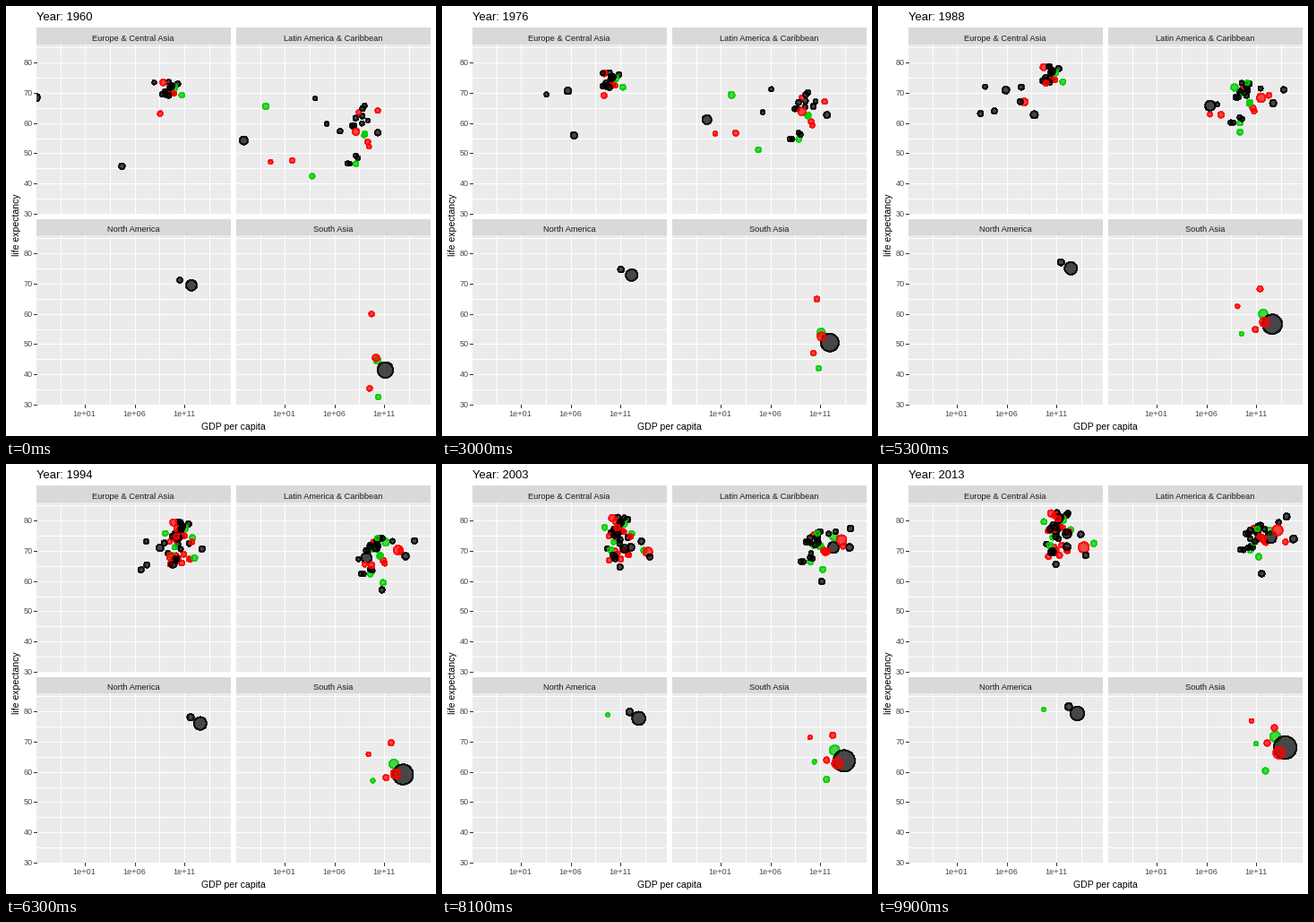
These frames come from a looping animation (480 px wide and 480 px high, 10 s). A matplotlib script:

```python
import numpy as np
import matplotlib.pyplot as plt
from matplotlib.animation import FuncAnimation
from matplotlib.patches import Rectangle

FRAMES = 100
LAST = FRAMES - 1
SIZE, DPI = 480, 80
PT = 72 / DPI                       # points per pixel
DECADE, PER_YEAR = 11.08, 3.376     # pixels per power of ten, per year of life
BLACK, RED, GREEN = (0, 0, 0), (1, 0, 0), (0, .804, 0)

plt.rcParams["font.family"] = "Liberation Sans"
rng = np.random.default_rng(8)


def lerp(a, b, f):
    return a + (b - a) * f


class Bubble:
    """Moves from a to b, both (log10 GDP, life expectancy).

    A surge (first, last) packs the GDP change into an eased inflation period.
    """

    def __init__(self, color, d, a, b, start=0, end=LAST, surge=None):
        self.color, self.d, self.a, self.b = color, d, a, b
        self.start, self.end, self.surge = start, end, surge

    def at(self, i):
        p = (i - self.start) / (LAST - self.start)
        f = p
        if self.surge:
            first, last = self.surge
            u = np.clip((i - first) / (last - first), 0, 1)
            f = u * u * (3 - 2 * u)
        return lerp(self.a[0], self.b[0], f), lerp(self.a[1], self.b[1], p ** .9)

    def diameter(self, i):
        return lerp(*self.d, i / LAST)


def cloud(n, colors, gdp0, gdp1, life0, life1, start=0, big=6.5):
    """Small bubbles that keep their rank while the whole cloud drifts."""
    bubbles = []
    for k in range(n):
        u, v = rng.random(2)
        d = rng.uniform(5, big)
        bubbles.append(Bubble(colors[k % len(colors)], (d, d + .8),
                              (lerp(*gdp0, u), lerp(*life0, v)),
                              (lerp(*gdp1, u), lerp(*life1, v)), start + k % 4 * (start > 0)))
    return bubbles


europe = cloud(16, (BLACK, BLACK, RED, BLACK, BLACK, RED, GREEN, BLACK),
               (8.8, 10.8), (10.4, 12.5), (68.5, 73.5), (76, 82.5), big=8)
europe += cloud(22, (RED, BLACK, RED, BLACK, RED, GREEN),
                (8.7, 11.8), (9.5, 12.4), (64, 77), (67, 82), start=56)
europe += [
    Bubble(BLACK, (9, 9), (-3.9, 68.3), (-3.9, 68.3), end=9),
    Bubble(BLACK, (8, 8.5), (5.75, 70.3), (12.1, 71.2), start=10, surge=(50, 78)),
    Bubble(BLACK, (7, 10), (4.75, 45.6), (12.1, 75.5), surge=(0, LAST)),
    Bubble(BLACK, (5, 6), (3.6, 66.6), (10.4, 76.7), start=9, surge=(50, 75)),
    Bubble(BLACK, (5, 6), (8, 73.3), (12.2, 82.3)),
    Bubble(RED, (6, 7), (8.6, 63), (11.2, 80.5)),
    Bubble(BLACK, (7, 7), (12.7, 69.5), (13.5, 75.3), start=57),
    Bubble(GREEN, (7, 7), (11.6, 66.5), (14.8, 72.3), start=57),
    Bubble(RED, (4, 12), (7.8, 66.5), (13.8, 71), start=50, surge=(53, 80)),
]
for a, b in [((7.4, 66.8), (14, 68.4)), ((4.8, 63.4), (10.5, 69.3)),
             ((3.4, 62.8), (11, 65.4)), ((7.5, 71.5), (11, 74.6))]:
    europe.append(Bubble(BLACK, (6, 7), a, b, start=50, surge=(53, 75)))

latin = cloud(17, (BLACK, BLACK, RED, BLACK, GREEN, BLACK),
              (7.2, 9.5), (9.3, 12), (46, 66), (70, 78.5))
latin += cloud(6, (BLACK, GREEN, BLACK), (8.2, 10), (9.4, 11.4), (68, 73), (72, 79), start=38)
latin += [
    Bubble(GREEN, (7, 9), (-.9, 65.4), (12.4, 76.4), surge=(10, 75)),
    Bubble(GREEN, (6, 7), (3.8, 42.3), (11.3, 67.9), surge=(18, 70)),
    Bubble(BLACK, (9.5, 13.5), (-3.1, 54.1), (12.5, 74.3), surge=(10, 85)),
    Bubble(BLACK, (5, 6), (4.1, 68), (11.9, 77), surge=(5, 80)),
    Bubble(BLACK, (5, 5.5), (5.25, 59.6), (10.2, 70.9), surge=(30, 85)),
    Bubble(BLACK, (6, 7.5), (6.6, 57.2), (14.1, 81.2), surge=(0, 60)),
    Bubble(BLACK, (7, 8.5), (10.4, 56.7), (14.8, 73.8)),
    Bubble(BLACK, (5, 6), (9.4, 60.7), (13.3, 79.3)),
    Bubble(BLACK, (6, 7), (10.7, 56), (11.6, 62.3), start=58),
    Bubble(RED, (5, 6), (-.4, 47), (11.4, 74.6), surge=(20, 80)),
    Bubble(RED, (6, 8), (1.8, 47.5), (11.7, 74), surge=(20, 80)),
    Bubble(RED, (8, 12), (8.2, 57), (13.2, 76.7), surge=(10, 80)),
    Bubble(RED, (6, 6), (10.4, 64), (14, 72.8)),
]

north = [
    Bubble(GREEN, (5, 5), (9.77, 78), (9.77, 80.5), start=75),
    Bubble(BLACK, (6.5, 8.5), (10.58, 71), (12.29, 81.4)),
    Bubble(BLACK, (12.5, 16), (11.75, 69.3), (13.15, 79.2)),
]

south = [
    Bubble(GREEN, (6, 6), (10.44, 32.4), (11.98, 60.2), end=40),
    Bubble(GREEN, (7, 7), (11.6, 56.4), (11.98, 60.2), start=76),
    Bubble(GREEN, (8, 12), (10.35, 44.5), (12.97, 71.5)),
    Bubble(GREEN, (5, 5), (9.1, 47), (11.03, 69.2), start=38),
    Bubble(BLACK, (18, 26), (11.16, 41.3), (13.96, 67.9)),
    Bubble(RED, (5, 5), (8.7, 56.7), (10.58, 76.7), start=38),
    Bubble(RED, (6, 7), (9.58, 35.2), (12.16, 69.4)),
    Bubble(RED, (8, 13), (10.22, 45.3), (13.33, 66.1)),
    Bubble(RED, (6, 7), (9.77, 59.8), (12.88, 74.4)),
]

fig = plt.figure(figsize=(SIZE / DPI, SIZE / DPI), dpi=DPI, facecolor="white")
ax = fig.add_axes([0, 0, 1, 1])
ax.set(xlim=(0, SIZE), ylim=(SIZE, 0))
ax.axis("off")


def box(x, top, bottom, color):
    return ax.add_patch(Rectangle((x, top), 217, bottom - top, fc=color, lw=0, zorder=0))


def line(xs, ys, color):
    ax.plot(xs, ys, color=color, lw=PT, zorder=1, solid_capstyle="butt", antialiased=False)


def text(x, y, s, px, color="black", **kw):
    return ax.text(x, y, s, fontsize=px * PT, color=color, **kw)


class Panel:
    def __init__(self, x, strip, top, bottom, title, bubbles):
        self.x, self.bottom, self.bubbles = x, bottom, bubbles
        box(x, strip, top, "#D9D9D9")
        text(x + 108, top - 4, title, 9.3, "#1A1A1A", ha="center")
        area = box(x, top, bottom, "#EBEBEB")
        self.grid(top)
        self.dots = ax.scatter([], [], linewidths=PT, zorder=3, antialiased=False)
        self.dots.set_clip_path(area)

    def place(self, gdp, life):
        return self.x + 42.8 + DECADE * gdp, self.bottom - .5 - PER_YEAR * (life - 30)

    def grid(self, top):
        x, bottom = self.x, self.bottom
        for life in range(30, 90, 5):
            y = int(self.place(0, life)[1]) + .5
            line([x, x + 217], [y, y], "white")
            if x < 100 and life % 10 == 0:
                line([x - 3, x], [y, y], "#333333")
                text(x - 4.5, y + 3.5, life, 9.2, "#4D4D4D", ha="right")
        for k, power in enumerate(np.arange(-1.5, 14, 2.5)):
            gx = int(self.place(power, 0)[0]) + .5
            line([gx, gx], [top, bottom], "white")
            if bottom > 400 and k % 2:
                line([gx, gx], [bottom, bottom + 3], "#333333")
                text(gx, bottom + 13.5, f"1e+{power:02.0f}", 9.2, "#4D4D4D", ha="center")

    def draw(self, i):
        live = [b for b in self.bubbles if b.start <= i <= b.end]
        self.dots.set_offsets([self.place(*b.at(i)) for b in live])
        self.dots.set_sizes([((b.diameter(i) - .5) * PT) ** 2 for b in live])
        self.dots.set_facecolor([(*b.color, .7) for b in live])
        self.dots.set_edgecolor([(*b.color, .8) for b in live])


panels = [
    Panel(34, 24, 43, 232, "Europe & Central Asia", europe),
    Panel(257, 24, 43, 232, "Latin America & Caribbean", latin),
    Panel(34, 238, 256, 445, "North America", north),
    Panel(257, 238, 256, 445, "South Asia", south),
]
year = text(34, 16.5, "", 13)
text(253.5, 473, "GDP per capita", 10.5, ha="center")
text(12, 244.5, "life expectancy", 10.5, rotation=90, ha="center", va="center")


def update(i):
    year.set_text(f"Year: {round(1960 + 53 * i / LAST)}")
    for panel in panels:
        panel.draw(i)
    return [year] + [panel.dots for panel in panels]


anim = FuncAnimation(fig, update, frames=FRAMES, interval=100, repeat=True, repeat_delay=0)
plt.show()
```
